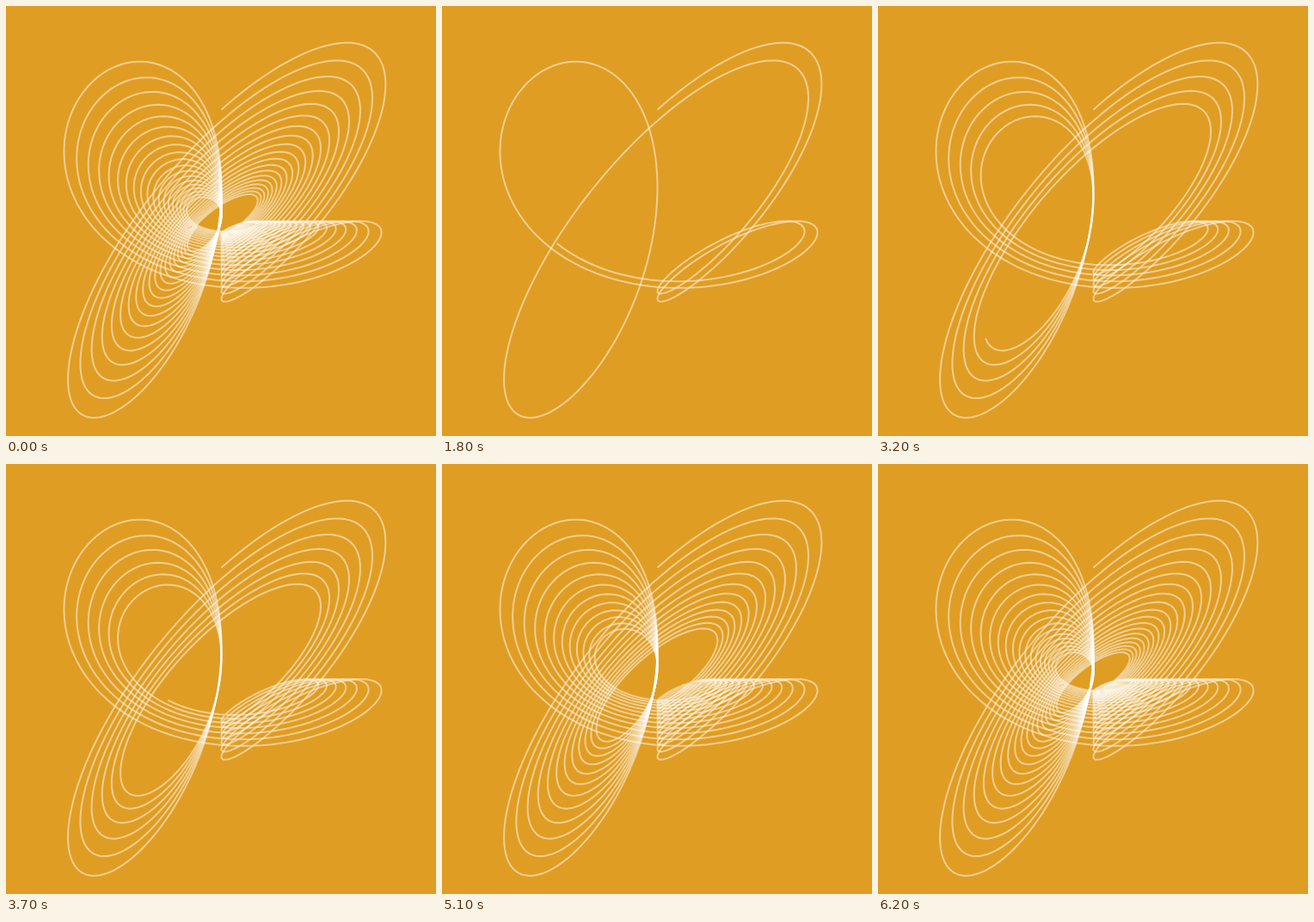
Recreate the animation shown at these times as an HTML page with a canvas. Size 500 by 500 pixels, loop 6.3 s.

```html
<!DOCTYPE html>
<html lang="en">
<head>
<meta charset="utf-8">
<title>Harmonograph</title>
<style>
  html, body { margin: 0; width: 100%; height: 100%; overflow: hidden; background: #e09d23; }
  canvas { display: block; width: 500px; height: 500px; }
</style>
</head>
<body>
<canvas id="stage" width="500" height="500"></canvas>
<script>
const STEPS = 63, STEP_MS = 100;
const CENTER = 250.5, AMP = 125;
const ctx = document.getElementById('stage').getContext('2d');

// Two damped pendulums per axis.
function point(t) {
  const x = Math.exp(-t / 75) * (Math.sin(t) + Math.sin(3 * t));
  const y = Math.exp(-t / 60) * (Math.sin(2 * t + 0.2) + Math.sin(3 * t + 1));
  return [CENTER + AMP * x, CENTER - AMP * y];
}

const reach = step => 0.03 * step * step;

// Pieces are stroked separately so that crossings grow brighter.
function strokePiece(from, to) {
  const n = Math.max(2, Math.ceil((to - from) / 0.02));
  ctx.beginPath();
  for (let i = 0; i <= n; i++) {
    ctx.lineTo(...point(from + (to - from) * i / n));
  }
  ctx.stroke();
}

function draw(step) {
  ctx.fillStyle = '#e09d23';
  ctx.fillRect(0, 0, 500, 500);
  ctx.strokeStyle = 'rgba(255, 255, 255, 0.5)';
  ctx.lineWidth = 2;
  ctx.lineJoin = 'round';
  for (let i = 1; i <= step; i++) strokePiece(reach(i - 1), reach(i));
}

// The loop opens on the finished figure, then starts over.
const start = performance.now();
let shown = -1;
function tick(now) {
  const step = Math.floor(Math.max(0, now - start) / STEP_MS) % STEPS || STEPS;
  if (step !== shown) draw(shown = step);
  requestAnimationFrame(tick);
}
tick(start);
</script>
</body>
</html>
```
